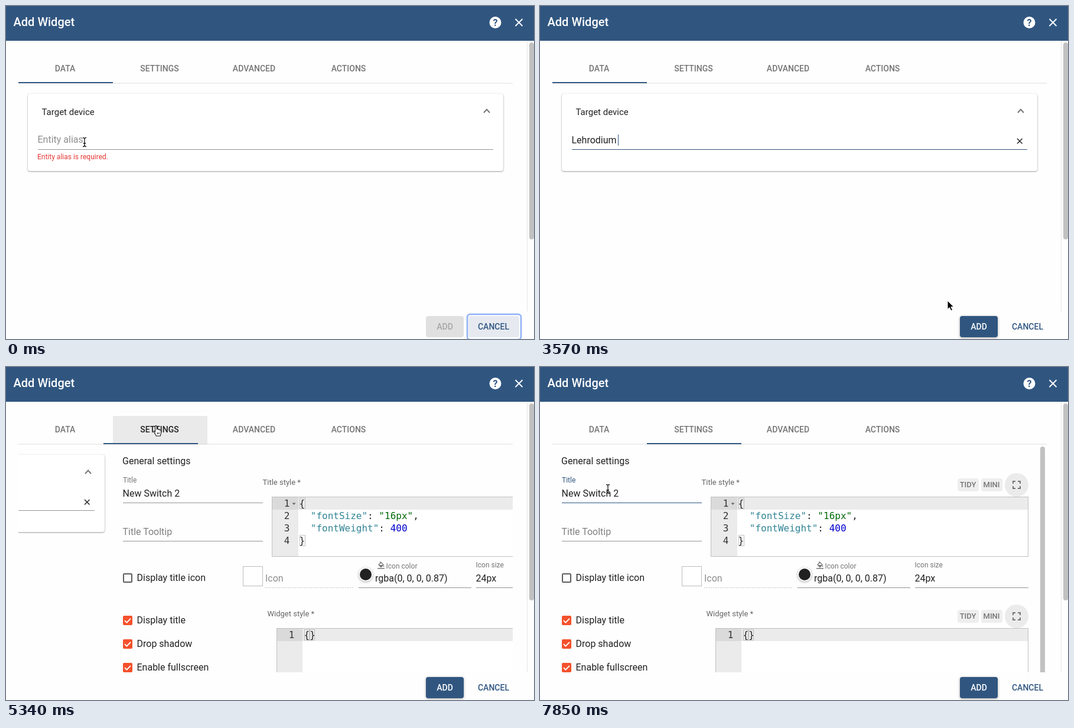
Animation, 894 px wide and 565 px high, one loop 8 s. Source, as an HTML page:

```html
<!DOCTYPE html>
<html lang="en">
<head>
<meta charset="utf-8">
<title>Add Widget</title>
<style>
html, body { margin: 0; width: 100%; height: 100%; overflow: hidden; background: #fefefe; }
svg { display: block; width: 894px; height: 565px; }
text { font: 400 16px Roboto, Arial, sans-serif; fill: #212121; white-space: pre; }
.t15 { font-size: 15px; }
.t14 { font-size: 14px; }
.t13 { font-size: 13px; fill: #666; }
.t12 { font-size: 12px; fill: #757575; }
.hint { fill: #8e8e8e; }
.btn { font-size: 14px; font-weight: 500; text-anchor: middle; }
.tab { fill: #757575; }
.tool { font-size: 13px; font-weight: 500; fill: #757575; text-anchor: middle; }
.code text { font: 400 16px "DejaVu Sans Mono", "Noto Sans Mono", monospace; fill: #222; }
.code .num { fill: #333; text-anchor: end; }
.code .key { fill: #318495; }
.code .str { fill: #036a07; }
.code .val { fill: #0000cd; }
.line { fill: #949494; }
.focus { fill: #305680; }
.card { fill: #fff; filter: drop-shadow(0 1px 1px rgba(0,0,0,.34)) drop-shadow(0 0 1px rgba(0,0,0,.12)); }
.menu { filter: drop-shadow(0 2px 2px rgba(0,0,0,.36)) drop-shadow(0 0 1px rgba(0,0,0,.25)); }
.raised { filter: drop-shadow(0 1px 2px rgba(0,0,0,.35)); }
.icon { fill: none; stroke: #757575; stroke-width: 2; }
.match { fill: none; stroke: #c0c0c0; }
</style>
</head>
<body>
<svg viewBox="0 0 894 565">
  <defs>
    <clipPath id="bodyClip"><rect x="21" y="132" width="837" height="386"/></clipPath>
    <clipPath id="tabClip"><rect x="181" y="83" width="160" height="48"/></clipPath>
    <g id="check">
      <rect width="16" height="16" rx="2" fill="#f4512c"/>
      <path d="M3 8.2l3.4 3.4L13 4.8" fill="none" stroke="#fff" stroke-width="1.9"/>
    </g>
    <g id="tools">
      <rect x="707" y="189" width="36" height="22" rx="4" fill="#eee"/>
      <rect x="747" y="189" width="36" height="22" rx="4" fill="#eee"/>
      <text class="tool" x="724.5" y="204">TIDY</text>
      <text class="tool" x="764.5" y="204">MINI</text>
      <circle cx="807" cy="200" r="20" fill="#ebebeb"/>
      <path class="icon" d="M801 198v-4h4M809 194h4v4M813 202v4h-4M805 206h-4v-4"/>
    </g>
  </defs>

  <rect width="894" height="565" fill="#fefefe"/>

  <!-- header -->
  <rect width="894" height="59" fill="#305680"/>
  <text x="12.5" y="34" style="font-size:20px;font-weight:500;fill:#fff">Add Widget</text>
  <circle cx="828.500" cy="28" r="10" fill="#fff"/>
  <text x="828.500" y="34" style="font-weight:700;fill:#305680;text-anchor:middle">?</text>
  <path d="M862.500 22l12 12m0-12l-12 12" stroke="#fff" stroke-width="2"/>
  <rect x="882" y="59" width="1" height="459" fill="#e6e6e6"/>
  <rect x="886" y="62" width="8" height="334" rx="4" fill="#c1c1c1"/>

  <!-- tabs -->
  <rect x="21" y="130.500" width="837" height="1" fill="#e0e0e0"/>
  <g clip-path="url(#tabClip)"><circle id="ripple" cx="254" cy="100"/></g>
  <text class="btn tab" x="100" y="111">DATA</text>
  <text class="btn tab" id="settingsTab" x="260" y="111">SETTINGS</text>
  <text class="btn tab" x="420" y="111">ADVANCED</text>
  <text class="btn tab" x="580" y="111">ACTIONS</text>
  <rect id="ink" x="21" y="129" width="160" height="2" fill="#305680"/>

  <g clip-path="url(#bodyClip)">
    <g id="dataPage">
      <rect class="card" x="37" y="149" width="805" height="131" rx="4"/>
      <rect x="38" y="148" width="803" height="1" fill="#f2f2f2"/>
      <text class="t15" x="60.500" y="185">Target device</text>
      <path class="icon" d="M809 181l5-5.500 5 5.500"/>
      <text id="aliasHint" class="hint" x="53.500" y="232">Entity alias</text>
      <rect id="aliasLine" class="line" x="54" y="243" width="771" height="1"/>
      <text id="error" class="t12" x="53" y="260" style="fill:#e53935">Entity alias is required.</text>
      <rect id="redCaret" x="54" y="218" width="1" height="19" fill="#f44336"/>
      <g id="chosen">
        <text x="53.500" y="233">Lehrodium</text>
        <path d="M808 225l8.500 8.500m0-8.500l-8.500 8.500" stroke="#222" stroke-width="1.500"/>
      </g>
      <rect id="aliasCaret" x="132" y="218" width="1" height="19" fill="#305680"/>
      <g id="menu">
        <path class="menu" d="M54 245h771v29q0 3-3 3H57q-3 0-3-3z" fill="#fff"/>
        <rect id="option" x="54" y="246" width="771" height="31" fill="#eee"/>
        <text class="t14" x="69.500" y="269">Lehrodium</text>
      </g>
    </g>

    <g id="settingsPage">
      <text x="36" y="165">General settings</text>
      <text id="titleLabel" class="t12" x="37" y="196">Title</text>
      <text x="36.500" y="220">New Switch 2</text>
      <rect id="titleCaret" x="133" y="205" width="1" height="19" fill="#305680"/>
      <rect id="titleLine" class="line" x="37" y="230" width="237" height="1"/>
      <text class="hint" x="36.500" y="285" style="fill:#808080">Title Tooltip</text>
      <rect class="line" x="37" y="295" width="237" height="1"/>

      <text class="t13" x="273.500" y="200">Title style *</text>
      <use href="#tools"/>
      <g class="code">
        <rect x="289.500" y="220.500" width="537" height="101" fill="#fff" stroke="#c0c0c0"/>
        <rect x="290" y="221" width="44" height="100" fill="#ebebeb"/>
        <rect x="290" y="221" width="44" height="21" fill="#dadada"/>
        <rect x="334" y="221" width="492" height="21" fill="#ebebeb"/>
        <path d="M323.500 230.500h6l-3 3.500z" fill="#666"/>
        <rect class="match" x="336.500" y="222.500" width="9" height="18"/>
        <rect class="match" x="336.500" y="285.500" width="9" height="18"/>
        <text class="num" x="319.500" y="237">1</text>
        <text class="num" x="319.500" y="258">2</text>
        <text class="num" x="319.500" y="279">3</text>
        <text class="num" x="319.500" y="300">4</text>
        <text x="335.500" y="237">{</text>
        <text x="335.500" y="258">  <tspan class="key">"fontSize"</tspan>: <tspan class="str">"16px"</tspan>,</text>
        <text x="335.500" y="279">  <tspan class="key">"fontWeight"</tspan>: <tspan class="val">400</tspan></text>
        <text x="335.500" y="300">}</text>
      </g>

      <rect x="38" y="351" width="14" height="14" rx="1.500" fill="none" stroke="#5c5c5c" stroke-width="2"/>
      <text x="60.500" y="363">Display title icon</text>
      <rect x="240.500" y="338.500" width="33" height="33" fill="#fff" stroke="#bdbdbd"/>
      <text class="hint" x="278" y="364">Icon</text>
      <path d="M278 374.500h149" stroke="#999" stroke-dasharray="1 2"/>
      <circle class="raised" cx="448" cy="352" r="11.500" fill="#fff"/>
      <circle cx="448" cy="352" r="10" fill="#212121"/>
      <path d="M470 335.500l4-4 4 4-4 4zM472 330.500l2 2M478.500 337v2" fill="none" stroke="#757575" stroke-width="1.300"/>
      <path d="M470 336h8l-4 4z" fill="#757575"/>
      <rect x="468" y="341" width="12" height="1.500" fill="#757575"/>
      <text class="t12" x="482.500" y="342">Icon color</text>
      <text x="464" y="364">rgba(0, 0, 0, 0.87)</text>
      <rect class="line" x="436" y="374" width="191" height="1"/>
      <text class="t12" x="634.500" y="340">Icon size</text>
      <text x="634.500" y="364">24px</text>
      <rect class="line" x="635" y="374" width="192" height="1"/>

      <use href="#check" x="37" y="422"/>
      <text x="60.500" y="435">Display title</text>
      <use href="#check" x="37" y="462"/>
      <text x="60.500" y="475">Drop shadow</text>
      <use href="#check" x="37" y="502"/>
      <text x="60.500" y="515">Enable fullscreen</text>

      <text class="t13" x="281.500" y="423">Widget style *</text>
      <use href="#tools" y="223"/>
      <g class="code">
        <rect x="297.500" y="443.500" width="529" height="101" fill="#fff" stroke="#c0c0c0"/>
        <rect x="298" y="444" width="43" height="100" fill="#ebebeb"/>
        <rect x="298" y="444" width="43" height="21" fill="#dadada"/>
        <rect x="341" y="444" width="485" height="21" fill="#ebebeb"/>
        <rect class="match" x="344.500" y="445.500" width="8" height="18"/>
        <rect class="match" x="353.500" y="445.500" width="8" height="18"/>
        <text class="num" x="327.500" y="460">1</text>
        <text x="343.500" y="460">{}</text>
      </g>
      <rect x="847" y="135" width="8" height="400" rx="4" fill="#c1c1c1"/>
    </g>
  </g>

  <!-- footer -->
  <rect id="addBox" x="711" y="526" width="64" height="36" rx="4"/>
  <text id="addText" class="btn" x="743" y="549">ADD</text>
  <g id="cancelFocus">
    <rect x="781" y="523" width="91" height="43" rx="5" fill="#fff" stroke="#8fb0f6" stroke-width="2.500"/>
    <rect x="783" y="526" width="86" height="36" rx="3" fill="#e6eaf0"/>
  </g>
  <text class="btn focus" x="825.500" y="549">CANCEL</text>

  <!-- pointers, hot spot at the origin -->
  <path id="arrow" d="M0 0V14.500L3.400 11.500 5.800 17 8.400 15.900 6 10.500H10.500Z" stroke="#fff"/>
  <path id="hand" d="M-1.500 10V1a1.400 1.400 0 0 1 2.800 0v5c0-1.600 2.600-1.600 2.600 0v.6c.2-1.400 2.400-1.300 2.400.2v.8c.3-1.200 2.200-1 2.200.4v3.500c0 2.500-1.200 3-1.200 5.500H.2c0-2-2-3.500-4-6.800-.8-1.600 1-2.400 2.300-.2zM2.500 11v3M5 11v3" fill="#fff" stroke="#111" stroke-width="1.100"/>
  <g id="beam" fill="none">
    <path d="M-3-7.500q3 0 3 2v11q0 2-3 2M3-7.500q-3 0-3 2v11q0 2 3 2M-2 2h4" stroke="#fff" stroke-width="2.600" opacity=".7"/>
    <path d="M-3-7.500q3 0 3 2v11q0 2-3 2M3-7.500q-3 0-3 2v11q0 2 3 2M-2 2h4" stroke="#111" stroke-width="1.300"/>
  </g>
</svg>
<script>
const LOOP = 8000, STEPS = 54, STEP = LOOP / STEPS;
const el = {};
document.querySelectorAll('svg [id]').forEach(e => el[e.id] = e);

// step, x, y
const path = [
  [0, 133, 231], [5, 133, 231], [6, 134, 230], [10, 134, 230], [11, 134, 238],
  [13, 132, 257], [15, 132, 258], [18, 132, 258], [19, 170, 285], [21, 520, 450],
  [23, 706, 517], [24, 690, 500], [26, 380, 203], [27, 300, 150], [28, 264, 112],
  [30, 254, 100], [36, 254, 100], [42, 234, 111], [43, 228, 122], [45, 203, 172],
  [47, 165, 225], [48, 150, 235], [50, 143, 233], [52, 120, 212], [53, 115, 207]
];
// first step of each pointer shape
const shapes = [[0, 'beam'], [12, 'hand'], [15, 'arrow'], [28, 'hand'], [44, 'arrow'], [46, 'beam']];

const show = (id, on) => el[id].style.display = on ? '' : 'none';
const within = (k, a, b) => k >= a && k < b;
const move = (id, x, y = 0) => el[id].setAttribute('transform', `translate(${x} ${y})`);

function ease(p) {
  p = Math.min(1, Math.max(0, p));
  let lo = 0, hi = 1;
  for (let i = 0; i < 24; i++) {
    const s = (lo + hi) / 2, r = 1 - s;
    if (1.05 * r * r * s + .75 * r * s * s + s * s * s < p) lo = s; else hi = s;
  }
  return lo * lo * (3 - 2 * lo);
}

function pointer(k) {
  const i = Math.max(1, path.findIndex(p => p[0] >= k));
  const [a, ax, ay] = path[i - 1], [b, bx, by] = path[i];
  const f = (k - a) / (b - a);
  const kind = shapes.filter(s => s[0] <= k).pop()[1];
  ['arrow', 'hand', 'beam'].forEach(id => show(id, id === kind));
  move(kind, Math.round(ax + (bx - ax) * f), Math.round(ay + (by - ay) * f));
}

function draw(k) {
  const t = k * STEP;
  pointer(k);

  // entity field
  const picked = k >= 15;
  show('aliasHint', !picked);
  show('error', k < 9);
  show('redCaret', within(k, 8, 12));
  show('menu', within(k, 9, 15));
  show('option', within(k, 12, 15));
  show('chosen', picked);
  show('aliasCaret', within(k, 15, 32) && Math.floor((k - 15) / 3.6) % 2 === 0);
  el.aliasLine.setAttribute('class', within(k, 8, 32) ? 'focus' : 'line');

  // buttons
  show('cancelFocus', k < 8);
  el.addBox.style.fill = k < 16 ? '#e0e0e0' : k < 17 ? '#567294' : '#305680';
  el.addBox.setAttribute('class', k > 16 ? 'raised' : '');
  el.addText.style.fill = k < 16 ? '#a6a6a6' : '#fff';

  // tab press and page slide
  show('ripple', within(k, 32, 39));
  el.ripple.setAttribute('r', Math.min(120, 33 + 42 * (k - 32)));
  el.ripple.style.opacity = k < 36 ? .115 : .08 - .03 * (k - 36);
  el.settingsTab.style.fill = within(k, 32, 49) ? '#212121' : '';
  const slide = 836 * ease((t - 5063) / 500);
  move('ink', Math.round(160 * ease((t - 5010) / 500)));
  move('dataPage', Math.round(-slide));
  move('settingsPage', Math.round(836 - slide));
  show('dataPage', slide < 836);
  show('settingsPage', slide > 0);

  // title field
  const typing = k >= 49;
  el.titleLabel.style.fill = typing ? '#305680' : '';
  el.titleLine.setAttribute('class', typing ? 'focus' : 'line');
  show('titleCaret', within(k, 50, 53));
}

let last = -1;
function tick() {
  const k = Math.floor((performance.now() % LOOP + 4) / STEP) % STEPS;
  if (k !== last) draw(last = k);
  requestAnimationFrame(tick);
}
tick();
</script>
</body>
</html>
```
